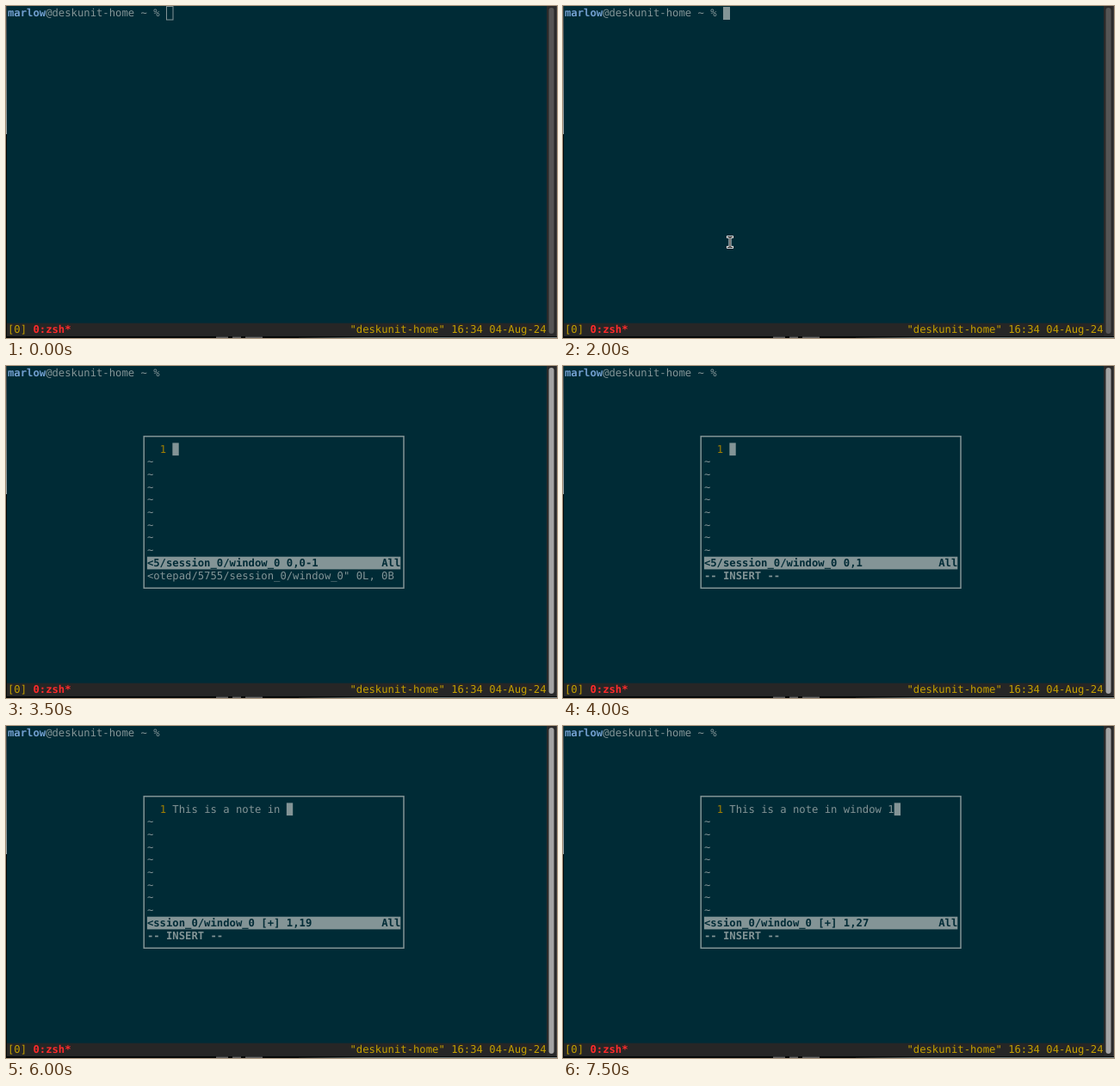
An HTML page for the animation above (8000 ms loop, 640 by 386 pixels).

```html
<!DOCTYPE html>
<html lang="en">
<head>
<meta charset="utf-8">
<title>Terminal notepad</title>
<style>
html, body { margin: 0; width: 100%; height: 100%; overflow: hidden; background: #000; }
svg { display: block; width: 100vw; height: 100vh; }
text {
  font: 12.226px "DejaVu Sans Mono", monospace;
  white-space: pre;
  text-rendering: geometricPrecision;
}
.bold { font-weight: bold; }
</style>
</head>
<body>
<svg id="stage" viewBox="0 0 640 386">
  <defs>
    <linearGradient id="left" x2="0" y2="1">
      <stop offset="0" stop-color="#3c4244"/>
      <stop offset="1" stop-color="#a5aaaa"/>
    </linearGradient>
    <linearGradient id="below">
      <stop offset="0" stop-color="#101414"/>
      <stop offset=".25" stop-color="#66706f"/>
      <stop offset="1" stop-color="#7d8888"/>
    </linearGradient>
  </defs>
</svg>
<script>
const CW = 7.36, CH = 14.7, LEFT = 2, TOP = 1.2;
const BG = '#002b36', FG = '#839496', GOLD = '#c4a000', RED = '#ff2b2b';
const LOOP = 8000;
const stage = document.getElementById('stage');

const colX = c => LEFT + c * CW;
const rowY = r => TOP + r * CH;

function add(tag, attrs, parent = stage) {
  const el = document.createElementNS('http://www.w3.org/2000/svg', tag);
  for (const k in attrs) el.setAttribute(k, attrs[k]);
  parent.appendChild(el);
  return el;
}

function rect(x, y, width, height, fill, parent) {
  return add('rect', { x, y, width, height, fill }, parent);
}

function write(col, row, str, fill = FG, bold = false, parent = stage) {
  const el = add('text', { x: colX(col), y: rowY(row) + 11.1, fill }, parent);
  if (bold) el.setAttribute('class', 'bold');
  el.textContent = str;
  return el;
}

function show(el, on) {
  el.setAttribute('visibility', on ? 'visible' : 'hidden');
}

// Window and edges
rect(0, 0, 640, 386, '#050808');
rect(1, 0, 627, 369, BG);
rect(0, 0, 1, 149, 'url(#left)');
rect(628, 0, 11, 384, '#2a2a2a');
rect(639, 0, 1, 384, '#3b3b3b');
const scrollbar = add('rect', { x: 630.5, y: 2, width: 6, height: 379, rx: 3 });
rect(1, 368.7, 627, 15.3, '#262626');
add('path', { d: 'M244 385.2h14m5 0h10m5 0h20', stroke: '#666', 'stroke-width': 1.6 });
rect(340, 385, 300, 1, 'url(#below)');

// Prompt
write(0, 0, 'marlow', '#729fcf', true);
write(6, 0, '@deskunit-home ~ %');
const hollow = add('rect', {
  x: 186.5, y: .5, width: 7.5, height: 15.5, fill: 'none', stroke: FG
});
const block = rect(186, 1, 8, 15, FG);

// Bottom bar
write(0, 25, '[0]', GOLD);
write(4, 25, '0:zsh*', RED, true);
write(54, 25, '"deskunit-home" 16:34 04-Aug-24', GOLD);

// Popup editor
const popup = add('g', {});
add('rect', {
  x: 160.2, y: 81.8, width: 301.8, height: 176.4, fill: BG, stroke: FG, 'stroke-width': 1.5
}, popup);
write(24, 6, '1', '#a08000', false, popup);
for (let r = 7; r <= 14; r++) write(22, r, '~', FG, false, popup);
rect(colX(22), rowY(15), 40 * CW, CH, FG, popup);
const file = write(22, 15, '', BG, true, popup);
const place = write(44, 15, '', BG, true, popup);
write(59, 15, 'All', BG, true, popup);
const message = write(22, 16, '', FG, false, popup);
const note = write(26, 6, '', FG, false, popup);
const caret = rect(0, rowY(6), CW, CH, FG, popup);

// I-beam pointer: dark core with a light outline
const pointer = add('g', { fill: 'none', 'stroke-linecap': 'square' });
const beam = 'M191.5 268.5h5M194 268.5v12M191.5 280.5h5';
add('path', { d: beam, stroke: '#e6e6e6', 'stroke-width': 3 }, pointer);
add('path', { d: beam, stroke: '#0c0c0c', 'stroke-width': 1 }, pointer);

const NOTE = 'This is a note in window 1';
// [time, characters typed]
const TYPING = [[4500, 3], [5000, 8], [5500, 9], [6000, 18], [6500, 24], [7000, 26]];

function draw(t) {
  const open = t >= 3500, insert = t >= 4000;
  let typed = 0;
  for (const [at, n] of TYPING) if (t >= at) typed = n;

  show(hollow, t < 2000);
  show(block, t >= 2000 && !open);
  show(pointer, t >= 2000 && t < 3000);
  show(popup, open);
  scrollbar.setAttribute('fill', t < 2500 ? '#555' : '#a4a4a4');

  file.textContent = typed ? '<ssion_0/window_0 [+]' : '<5/session_0/window_0';
  place.textContent = typed ? '1,' + (typed + 1) : insert ? '0,1' : '0,0-1';
  message.textContent = insert ? '-- INSERT --' : '<otepad/5755/session_0/window_0" 0L, 0B';
  message.setAttribute('class', insert ? 'bold' : '');
  note.textContent = NOTE.slice(0, typed);
  caret.setAttribute('x', colX(26 + typed));
}

const start = performance.now();
function tick() {
  draw((performance.now() - start) % LOOP);
  requestAnimationFrame(tick);
}
draw(0);
requestAnimationFrame(tick);
</script>
</body>
</html>
```
